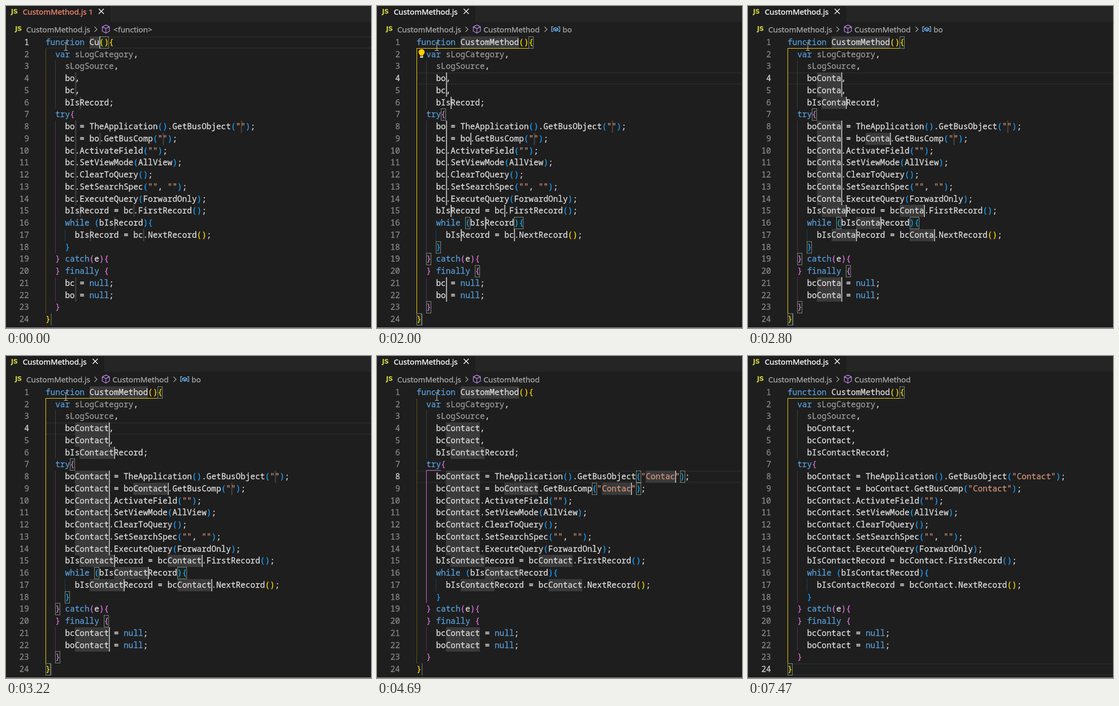
These frames come from a looping animation (720 by 635 pixels, 8020 ms). An HTML page with a canvas:

```html
<!DOCTYPE html>
<html lang="en">
<head>
<meta charset="utf-8">
<title>Snippet editing</title>
<style>
html, body { margin: 0; width: 100%; height: 100%; overflow: hidden; background: #1e1e1e; }
canvas { display: block; }
</style>
</head>
<body>
<canvas id="stage" width="720" height="635"></canvas>
<script>
const ctx = document.getElementById('stage').getContext('2d');
const LOOP = 8020, LEFT = 78, TOP = 60, CW = 9.622, LH = 23.75;
const MONO = '16.04px "Noto Sans Mono", monospace';
const UI = '15.2px "Noto Sans", sans-serif';
const PLAIN = '#dadada', LEVELS = ['#ffd700', '#da70d6', '#179fff'];
const KEYWORD = /^(function|var|try|while|catch|finally|null)$/;

// @ function name, # object name, $ quoted name, ^ final stop
const CODE = `function @(){
  var sLogCategory,
    sLogSource,
    bo#,
    bc#,
    bIs#Record;
  try{
    bo# = TheApplication().GetBusObject("$");
    bc# = bo#.GetBusComp("$");
    bc#.ActivateField("");
    bc#.SetViewMode(AllView);
    bc#.ClearToQuery();
    bc#.SetSearchSpec("", "");
    bc#.ExecuteQuery(ForwardOnly);
    bIs#Record = bc#.FirstRecord();
    while (bIs#Record){
      bIs#Record = bc#.NextRecord();
    }
  } catch(e){
  } finally {
    bc# = null;
    bo# = null;
  }
}^`.split('\n');

// typing times of the three fields; the first starts with two letters
const FIELDS = [
  ['CustomMethod', [0, 0, 130, 270, 400, 660, 930, 1060, 1320, 1470, 1590, 1730]],
  ['Contact', [2270, 2400, 2530, 2650, 2800, 3090, 3220]],
  ['Contact', [3880, 4020, 4300, 4300, 4570, 4690, 4970]]
];
const STOPS = [1870, 3480, 6930];
const CURRENT = [0, 3, 7, 23];
// column, first line, line after last, bracket level (-1: plain indent)
const GUIDES = [[0, 1, 23, 0], [2, 2, 6, -1], [2, 7, 18, 1], [2, 20, 22, 1], [4, 16, 17, 2]];
const MOUSE = [[0, 118, 80], [5230, 128, 400], [5350, 120, 624], [5490, 300, 621],
  [5610, 500, 614], [5730, 659, 607]];

const count = (times, t) => times.filter(x => x <= t).length;
const colX = col => LEFT + col * CW;
const rowY = row => TOP + Math.floor(row * LH + 0.49);

function rect(x, y, w, h, color) {
  ctx.fillStyle = color;
  ctx.fillRect(Math.round(x), y, Math.round(w), h);
}

// A hairline outline gives the text its slightly heavy weight
function text(str, x, y, color, font) {
  ctx.font = font;
  ctx.fillStyle = ctx.strokeStyle = color;
  ctx.lineWidth = 0.3;
  ctx.fillText(str, x, y);
  ctx.strokeText(str, x, y);
}

function stroke(path, color, width = 1) {
  ctx.strokeStyle = color;
  ctx.lineWidth = width;
  ctx.stroke(new Path2D(path));
}

// Expand the fields, colour the words and pair the brackets
function parse(t) {
  const words = FIELDS.map(([word, times]) => word.slice(0, count(times, t)));
  const fields = [], tokens = [], pairs = [], open = [];
  CODE.forEach((src, row) => {
    let line = '';
    for (const ch of src) {
      const kind = '@#$^'.indexOf(ch);
      if (kind < 0) { line += ch; continue; }
      const word = words[kind] || '';
      fields.push({ kind, row, col: line.length, len: word.length });
      line += word;
    }
    for (const { 0: str, index: col } of line.matchAll(/"[^"]*"|\w+|[(){}]|[^\s\w"(){}]+/g)) {
      let color = PLAIN;
      if (str[0] === '"') color = '#ce9178';
      else if (KEYWORD.test(str)) color = '#569cd6';
      else if (str.startsWith('sLog')) color = '#979797';
      else if ('({'.includes(str)) {
        color = LEVELS[open.length % 3];
        open.push({ row, col });
      } else if (')}'.includes(str)) {
        pairs.push([open.pop(), { row, col }]);
        color = LEVELS[open.length % 3];
      }
      tokens.push({ str, row, col, color });
    }
  });
  return { fields, tokens, pairs };
}

function drawHeader(t, settled) {
  const error = t < 930, tabW = error ? 206 : 194;
  rect(0, 0, 720, 31, '#252526');
  rect(0, 0, tabW, 31, '#1e1e1e');
  const badge = 'bold 12px "DejaVu Sans", sans-serif';
  text('JS', 10, 15, '#cbcb41', badge);
  text('CustomMethod.js' + (error ? ' 1' : ''), 33, 17, error ? '#f48771' : '#ffffff', UI);
  const x = tabW - 23;
  stroke(`M${x} 5.5l10 10m0-10l-10 10`, '#ffffff', 1.5);

  const grey = '#a9a9a9';
  text('JS', 18, 49, '#cbcb41', badge);
  text('CustomMethod.js', 40, 52, grey, UI);
  stroke('M174.500 41l5 5-5 5', grey, 1.3);
  stroke('M197 37.500l7 3.500v8.500l-7 4-7-4v-8.500zM190 41l7 3.500 7-3.500M197 44.500v9', '#b180d7', 1.4);
  const symbol = error ? '<function>' : settled ? 'CustomMethod' : 'Custom';
  text(symbol, error ? 212 : 210, 52, grey, UI);
  if (settled === 1) {
    stroke('M330.500 41l5 5-5 5', grey, 1.3);
    stroke('M347.500 41h-3v9h3M357.500 41h3v9h-3M348 44.500l4-2 5 2v3l-4 2-5-2zM348 44.500l5 2 4-2M353 46.500v3', '#75beff', 1.3);
    text('bo', 366, 52, grey, UI);
  }
}

function drawGuides(stop, pairs) {
  const active = [-1, 0, 2, 0][stop];
  GUIDES.forEach(([col, from, to, level], i) => {
    const on = i === active, x = colX(col), y = rowY(from);
    ctx.globalAlpha = on || level < 0 ? 1 : 0.3;
    const color = level < 0 ? '#404040' : LEVELS[level];
    rect(x, y, 1, rowY(to) - y, color);
    ctx.globalAlpha = 1;
    if (on) {
      const [start] = pairs.find(([a, b]) => a.row === from - 1 && b.row === to);
      rect(x, y - 1, colX(start.col) - x, 1, color);
    }
  });
}

// Box the innermost pair around each caret; touching boxes join
function drawBoxes(carets, pairs) {
  const at = p => p.row * 1000 + p.col;
  const cells = carets.flatMap(c =>
    pairs.find(([a, b]) => at(a) <= at(c) && at(c) <= at(b) + 1) || []);
  const taken = new Set(cells.map(at));
  for (const pos of taken) {
    if (taken.has(pos - 1)) continue;
    let n = 1;
    while (taken.has(pos + n)) n++;
    const x = Math.round(colX(pos % 1000)), y = rowY(Math.floor(pos / 1000));
    const w = Math.round(n * CW);
    rect(x, y, w, 24, 'rgba(0,100,0,.1)');
    ctx.strokeStyle = '#888888';
    ctx.lineWidth = 1;
    ctx.strokeRect(x + 0.5, y + 0.5, w - 1, 23);
  }
}

function drawBulb() {
  ctx.fillStyle = '#ffcc00';
  ctx.beginPath();
  ctx.arc(88, 91, 6, 0, 7);
  ctx.fill();
  rect(85, 95, 6, 3, '#ffcc00');
  rect(85, 99, 6, 3, '#d4d4d4');
}

function draw(t) {
  const stop = count(STOPS, t), settled = count(STOPS, t - 120);
  const { fields, tokens, pairs } = parse(t);
  const ends = kind => fields.filter(f => f.kind === kind)
    .map(f => ({ row: f.row, col: f.col + f.len }));
  const current = CURRENT[stop];

  rect(0, 0, 720, 635, '#1e1e1e');
  drawHeader(t, settled);
  rect(LEFT, rowY(current), 720 - LEFT, 2, '#282828');
  rect(LEFT, rowY(current + 1) - 2, 720 - LEFT, 2, '#282828');

  if (stop < 3) for (const { kind, row, col, len } of fields) {
    if (kind < 3) rect(colX(col), rowY(row), Math.max(3, len * CW), 24, '#3a3a3a');
    else rect(colX(col), rowY(row), 2, 24, '#525252');
  }
  drawGuides(stop, pairs);
  drawBoxes(ends(settled), pairs);

  CODE.forEach((_, row) => {
    const n = String(row + 1);
    text(n, 45.5 - n.length * CW, rowY(row) + 17, row === current ? '#d0d0d0' : '#858585', MONO);
  });
  for (const { str, row, col, color } of tokens) text(str, colX(col), rowY(row) + 17, color, MONO);

  if (t >= 930 && t < 2140) drawBulb();
  const hidden = t >= 5490 && t < 6000 || t >= 6400 && t < 6930 || t >= 7470;
  if (!hidden) for (const { row, col } of ends(stop)) rect(colX(col), rowY(row), 2, 24, '#aeafad');

  if (t < 5880) {
    const [, x, y] = MOUSE[count(MOUSE.map(m => m[0]), t) - 1];
    stroke(`M${x - 3.5} ${y - 7.5}h3l.5.5.5-.5h3M${x} ${y - 7}v14M${x - 3.5} ${y + 7.5}h3l.5-.5.5.5h3`, '#d8d8d8');
  }
  rect(0, 634, 720, 1, '#aaa4a6');
}

function frame(now) {
  draw(now % LOOP);
  requestAnimationFrame(frame);
}
draw(0);
requestAnimationFrame(frame);
</script>
</body>
</html>
```
